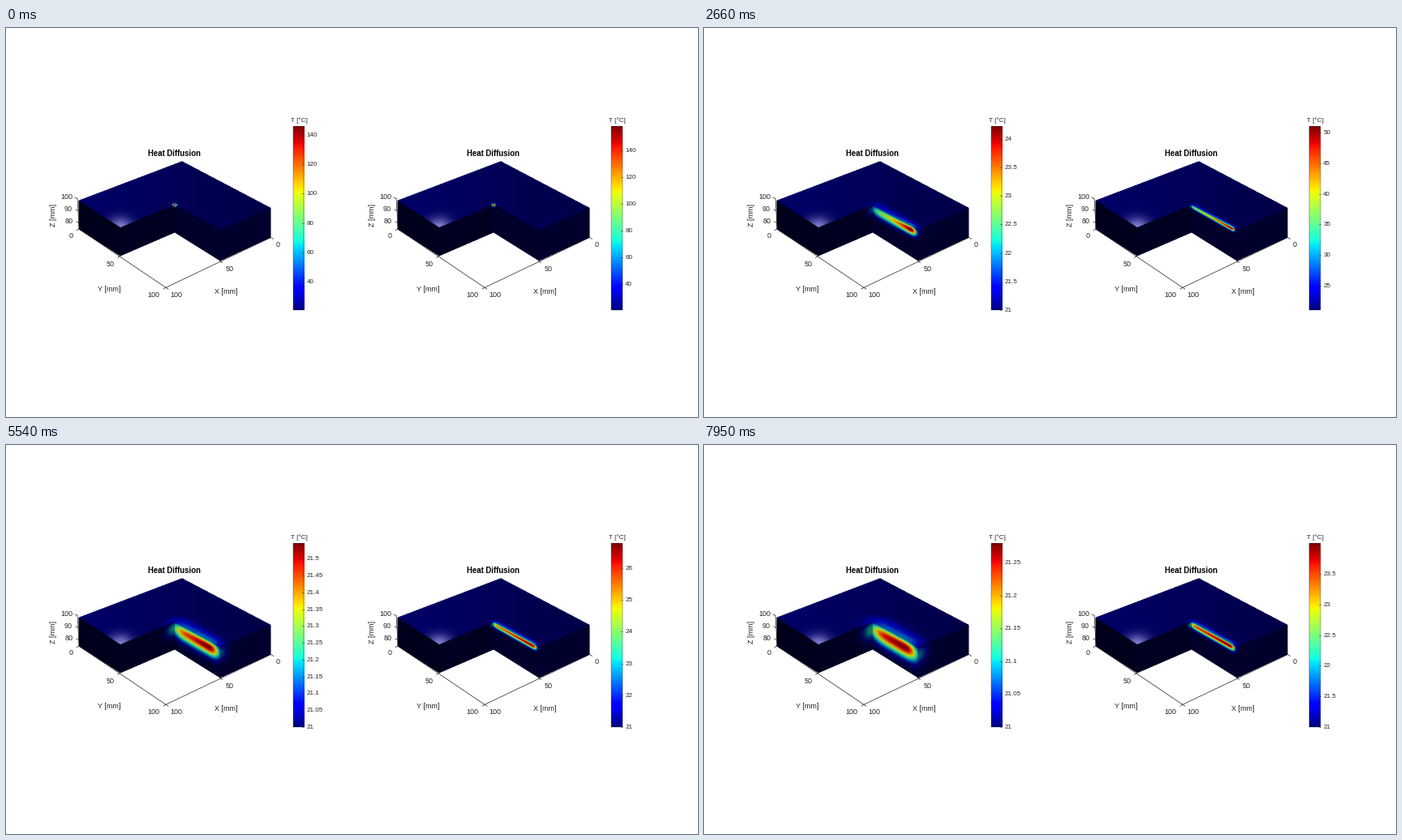
These frames come from a looping animation (853 by 480 pixels, 8000 ms). A matplotlib script:

```python
import math

import matplotlib.pyplot as plt
import numpy as np
from matplotlib.animation import FuncAnimation
from matplotlib.path import Path

W, H, DPI = 853, 480, 64
TICK_MS, LOOP_MS = 20, 8000
LAST_STEP = 21          # the heat source switches off here
SPEED = 2.2             # mm per step along the cut
AMBIENT = 21.0
COOLING = 0.65          # how much the open top surface draws off
INK = "#262626"
JET = plt.get_cmap("jet")

# Window holding the block, in pixels of the left panel
X0, X1, Y0, Y1 = 88, 328, 163, 290
SUB = 2                 # supersampling

# x, top y, bottom y of both ends, then brightness when cold and hot
WALLS = {
    "left": (89.7, 212.7, 248.5, 141, 246, 281.5, 0.22, 0.5),
    "inner_y": (141, 246, 281.5, 208, 218, 252.5, 0.26, 0.5),
    "inner_x": (208, 218, 252.5, 264, 249, 287.5, 0.34, 0.82),
    "right": (264, 249, 287.5, 326.7, 222, 258.5, 0.36, 0.5),
}
TOP = [(89.7, 212.7), (217, 164.3), (326.7, 222), (264, 249), (208, 218), (141, 246)]
CORNER = (208, 218)

# Peak excess, decay constants, and spread of the heat in each material
PANELS = [
    dict(dx=0, bar=354, peak=124.5, a=1.88, b=0.3, fade=3.0, s0=1.2, grow=0.32),
    dict(dx=393, bar=746.5, peak=136.5, a=9.1, b=6.8, fade=10.0, s0=1.0, grow=0.036),
]


def build_block():
    """Brightness and glare per sample, and 3D places of the samples near the heat."""
    gx, gy = np.meshgrid(np.arange(X0, X1, 1 / SUB) + 0.5 / SUB,
                         np.arange(Y0, Y1, 1 / SUB) + 0.5 / SUB)
    cold = np.full(gx.shape, np.nan)
    hot = np.ones(gx.shape)
    off, along, depth = (np.full(gx.shape, 1e3) for _ in range(3))

    pts = np.column_stack([gx.ravel(), gy.ravel()])
    top = Path(TOP).contains_points(pts).reshape(gx.shape)
    px, py = gx - CORNER[0], gy - CORNER[1]
    det = 56 * -27 - 64 * 31
    u = (-27 * px - 64 * py) / det
    w = (56 * py - 31 * px) / det
    cold[top] = np.clip(0.82 - 0.0011 * (gx - 90), 0.4, 0.9)[top]
    hot[top] = 0.75
    off[top], along[top], depth[top] = -50 * w[top], 50 + 50 * u[top], 0
    glare = np.where(top, np.exp(-((gx - 141) / 15) ** 2 - ((gy - 246) / 12) ** 2), 0)

    for name, (xa, ta, ba, xb, tb, bb, dim, bright) in WALLS.items():
        u = (gx - xa) / (xb - xa)
        t, b = ta + (tb - ta) * u, ba + (bb - ba) * u
        v = (gy - t) / (b - t)
        face = (u >= 0) & (u < 1) & (v >= 0) & (v < 1)
        cold[face], hot[face] = dim, bright
        if name == "inner_x":
            off[face], along[face] = 0, 50 + 50 * u[face]
        elif name == "inner_y":
            off[face], along[face] = 50 - 50 * u[face], 50
        elif name == "right":
            off[face], along[face] = -50 * u[face], 100
        depth[face] = 25 * v[face]

    near = (np.abs(off) < 24) & (along > 28)
    return cold, hot, glare, near, (off[near], along[near], depth[near])


COLD, HOT, GLARE, NEAR, PLACES = build_block()


def heat(step, p):
    """Heat left by the moving source, scaled to 0..1 at the samples near it."""
    off, along, depth = PLACES
    total = np.zeros(off.shape)
    for s in np.arange(0, min(step, LAST_STEP) + 0.01, 0.5):
        age = step - s
        var = p["s0"] + p["grow"] * age
        sink = 0.9 * math.sqrt(p["grow"] * age)
        amp = (1 + age / p["fade"]) ** -1.5 / math.sqrt(var)
        flat = np.exp(-(off ** 2 + (along - 50 - SPEED * s) ** 2) / (2 * var))
        down = (np.exp(-(depth - sink) ** 2 / (2 * var))
                - COOLING * np.exp(-(depth + sink) ** 2 / (2 * var)))
        total += amp * flat * down
    return total / total.max()


def render(step, p):
    u = np.zeros(COLD.shape)
    u[NEAR] = heat(step, p)
    lit = COLD + (HOT - COLD) * np.clip(2 * u, 0, 1)
    rgb = JET(u)[..., :3] * lit[..., None]
    rgb += GLARE[..., None] * np.array([0.5, 0.5, 0.42])
    rgb[np.isnan(COLD)] = 1
    h, w = Y1 - Y0, X1 - X0
    rgb = rgb.reshape(h, SUB, w, SUB, 3).mean(axis=(1, 3))
    return (np.clip(rgb, 0, 1) * 255).astype(np.uint8)


def excess(step, p):
    age = max(0, step - LAST_STEP)
    a = p["a"] + p["b"] * math.exp(-age / 25)
    return p["peak"] * (1 + age / a) ** -1.5


def nice_step(span):
    for e in range(-3, 3):
        for m in (1, 2, 5):
            if span / (m * 10.0 ** e) <= 11.2:
                return m * 10.0 ** e
    return 1000.0


def step_at(ms):
    if ms < 200:
        return 0
    if ms < 6150:
        return min(98, 1 + (ms - 200) // 60)
    return 99 + (ms - 6150) // 60


fig = plt.figure(figsize=(W / DPI, H / DPI), dpi=DPI, facecolor="white")
ax = fig.add_axes([0, 0, 1, 1])
ax.axis("off")
plt.rcParams["font.family"] = "Liberation Sans"


def label(x, y, s, px=9, ha="center", **kw):
    kw.setdefault("color", INK)
    return ax.text(x, y, s, fontsize=px * 72 / DPI, ha=ha, va="center", **kw)


class Panel:
    def __init__(self, p):
        self.p, self.cache = p, {}
        dx = p["dx"]
        self.block = ax.imshow(np.zeros((2, 2, 3)), aspect="auto",
                               interpolation="nearest",
                               extent=(X0 + dx, X1 + dx, Y1, Y0), zorder=1)
        self.draw_axes(dx)
        self.draw_bar(p["bar"])

    def draw_axes(self, dx):
        def line(*pts):
            xs, ys = zip(*pts)
            ax.plot([x + dx for x in xs], ys, color=INK, lw=0.8, zorder=2)

        line((88, 210.5), (90.3, 248.3), (197, 320.3), (326.5, 258.5))
        for x, y in ((88, 210.5), (89, 225.5), (89.8, 240.5)):
            line((x, y), (x - 3, y - 1.5))
        for x, y in ((90, 248), (140.5, 281.5), (197, 320.3)):
            line((x, y), (x - 3, y + 1.7))
        for x, y in ((326.5, 258.5), (263.5, 287.5), (197, 320.3)):
            line((x, y), (x + 3, y + 1.9))

        label(208 + dx, 155, "Heat Diffusion", 9.6, weight="bold", color="black")
        for x, y, s in ((82, 208.5, "100"), (82, 223.5, "90"), (83, 238.5, "80")):
            label(x + dx, y, s, ha="right")
        for x, y, s in ((80.5, 256.5, "0"), (128.5, 291, "50"), (182, 329, "100"),
                        (335.5, 268, "0"), (276, 298, "50"), (210, 330, "100"),
                        (271.5, 325, "X [mm]"), (127, 322.5, "Y [mm]")):
            label(x + dx, y, s)
        label(58.5 + dx, 231, "Z [mm]", rotation=90)

    def draw_bar(self, x):
        self.top, self.base, self.right = 121.5, 348, x + 13.5
        ax.imshow(np.linspace(1, 0, 256)[:, None], cmap="jet", aspect="auto",
                  interpolation="nearest", zorder=1,
                  extent=(x, self.right, self.base, self.top))
        ax.plot([x, self.right, self.right, x, x],
                [self.top, self.top, self.base, self.base, self.top],
                color=INK, lw=0.4, zorder=2)
        label(x + 7, 113.8, "T [°C]", 8)
        self.marks, = ax.plot([], [], color=INK, lw=0.6, zorder=3)
        self.names = [label(self.right + 3.3, 0, "", 8, ha="left") for _ in range(13)]

    def update(self, step):
        if step not in self.cache:
            self.cache[step] = render(step, self.p)
        self.block.set_data(self.cache[step])

        span = excess(step, self.p)
        gap = nice_step(span)
        first = math.ceil(AMBIENT / gap - 1e-6)
        last = math.floor((AMBIENT + span) / gap + 1e-6)
        values = [k * gap for k in range(first, last + 1)]
        xs, ys = [], []
        for text in self.names:
            text.set_text("")
        for text, v in zip(self.names, values):
            y = self.base - (v - AMBIENT) / span * (self.base - self.top)
            text.set_text(f"{v:.6g}")
            text.set_y(y + 0.5)
            xs += [self.right - 2, self.right, math.nan]
            ys += [y, y, math.nan]
        self.marks.set_data(xs, ys)


panels = [Panel(p) for p in PANELS]
ax.set_xlim(0, W)
ax.set_ylim(H, 0)


def draw(i):
    step = step_at(i * TICK_MS + TICK_MS // 2)
    for panel in panels:
        panel.update(step)
    return []


anim = FuncAnimation(fig, draw, frames=LOOP_MS // TICK_MS, interval=TICK_MS,
                     init_func=lambda: [], repeat=True, repeat_delay=0)
plt.show()
```
